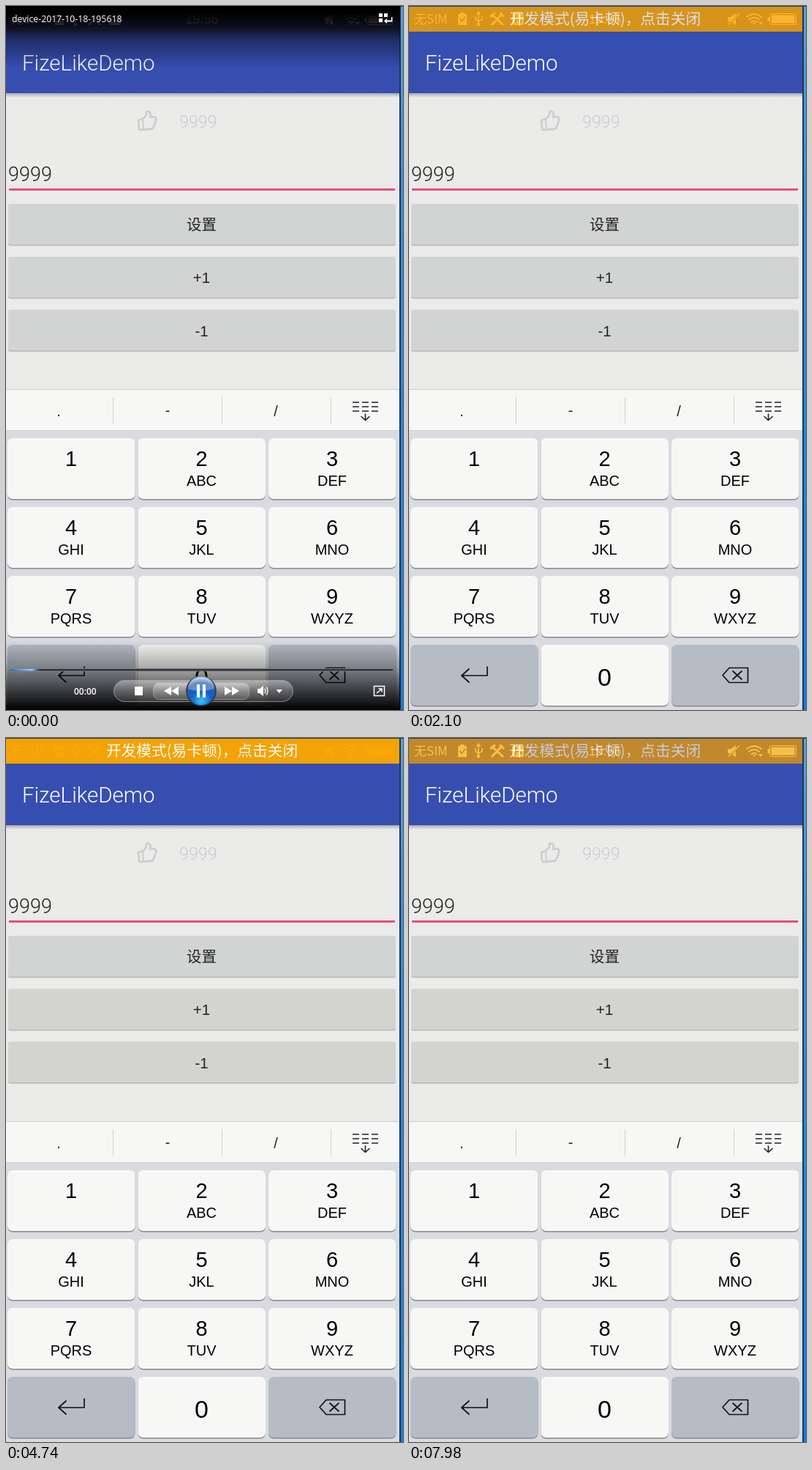
These frames come from a looping animation (543 by 961 pixels, 8000 ms). An HTML page:

```html
<!DOCTYPE html>
<html lang="zh">
<head>
<meta charset="utf-8">
<title>Like counter demo</title>
<style>
html, body { margin: 0; width: 100%; height: 100%; overflow: hidden; background: #ebebe9; }
svg { display: block; width: 543px; height: 961px; font-family: "Liberation Sans", "Noto Sans CJK SC", "Noto Sans CJK", sans-serif; }
.light { font-family: Roboto, sans-serif; font-weight: 300; }
.cjk { font-family: "Noto Sans CJK SC", "Noto Sans CJK", sans-serif; }
.player { font-family: "Open Sans", "Noto Sans", sans-serif; }
.mid { text-anchor: middle; }
.line { fill: none; stroke-linecap: round; stroke-linejoin: round; }
</style>
</head>
<body>
<svg viewBox="0 0 543 961">
  <defs>
    <linearGradient id="edge" x2="0" y2="1"><stop stop-color="#5f9fd4"/><stop offset=".3" stop-color="#2f8fe2"/><stop offset="1" stop-color="#0f7fe6"/></linearGradient>
    <linearGradient id="shadow" x2="0" y2="1"><stop stop-color="#a9abb2"/><stop offset="1" stop-color="#ebebe9"/></linearGradient>
    <linearGradient id="topShade" x2="0" y2="1"><stop offset=".1"/><stop offset=".32" stop-opacity=".82"/><stop offset=".55" stop-opacity=".42"/><stop offset="1" stop-opacity="0"/></linearGradient>
    <linearGradient id="bottomShade" x2="0" y2="1"><stop stop-opacity="0"/><stop offset=".4" stop-opacity=".32"/><stop offset=".72" stop-opacity=".68"/><stop offset="1"/></linearGradient>
    <linearGradient id="pill" x2="0" y2="1"><stop stop-color="#fff" stop-opacity=".42"/><stop offset=".5" stop-color="#fff" stop-opacity=".2"/><stop offset="1" stop-color="#fff" stop-opacity=".1"/></linearGradient>
    <radialGradient id="orb" cy=".85" r=".8"><stop stop-color="#35c4ff"/><stop offset=".45" stop-color="#1560c0"/><stop offset=".8" stop-color="#2b5aa8"/><stop offset="1" stop-color="#a9c6ea"/></radialGradient>
    <linearGradient id="progress"><stop stop-color="#2d6fd0"/><stop offset=".7" stop-color="#9fd0ff"/><stop offset="1" stop-color="#3a78c8" stop-opacity="0"/></linearGradient>
    <g id="thumb" class="line" stroke-width="2.8">
      <path d="M181 156 187 154Q192 151 192 146 192 143 195 144 199 145 197 152L202 151Q206 152 205 156L202 165Q201 168 198 168L184 169Q182 169 182 167Z"/>
      <path d="M187 155 188 168" stroke-width="2"/>
    </g>
  </defs>

  <rect width="543" height="961" fill="#ebebe9"/>

  <!-- status bar -->
  <rect width="539" height="35" fill="#323f97"/>
  <g fill="#fff">
    <text class="cjk" x="7" y="24" font-size="17">无SIM</text>
    <text class="mid" x="268" y="24" font-size="18">19:56</text>
    <path d="M67 11H70V9H76V11H79V26H67Z"/>
    <path class="line" d="M70 18 72 21 77 15" stroke="#323f97" stroke-width="1.6"/>
    <path class="line" d="M95 10V25M91 14V18L95 21 100 18V14M93 11 95 8 97 11" stroke="#fff" stroke-width="1.6"/>
    <circle cx="95" cy="25" r="2.2"/>
    <path class="line" d="M114 12 128 25M127 11 114 25M112 14 117 10M125 10 129 14" stroke="#fff" stroke-width="3"/>
    <rect x="141" y="10" width="16" height="16" rx="2"/>
    <path class="line" d="M146 13V22M146 18H150M153 19V22" stroke="#323f97" stroke-width="1.7"/>
    <path d="M436 15H440L447 10V26L440 21H436Z"/>
    <path d="M437 26 451 11" stroke="#323f97" stroke-width="3"/>
    <path d="M437 25 452 10" stroke="#fff" stroke-width="1.5"/>
    <path class="line" d="M462 15Q472 7 482 15M465 18.500Q472 13 479 18.500M468.500 22Q472 19 475.500 22" stroke="#fff" stroke-width="2"/>
    <path d="M470 23H474L472 26ZM478 22H484L481 26Z"/>
    <rect x="493.500" y="10.500" width="36" height="15" rx="2" fill="none" stroke="#fff"/>
    <path d="M495.500 12.500H527.500V23.500H495.500ZM490.500 15H493V21H490.500Z"/>
  </g>
  <g id="notice">
    <rect width="539" height="35" fill="#f9a602"/>
    <text class="cjk mid" x="268" y="25" font-size="20.700" fill="#fff">开发模式(易卡顿)，点击关闭</text>
  </g>

  <!-- toolbar -->
  <rect y="35" width="539" height="84" fill="#374eb1"/>
  <rect y="119" width="539" height="6" fill="url(#shadow)"/>
  <text class="light" x="22" y="88" font-size="29.500" fill="#fff">FizeLikeDemo</text>

  <!-- like counter -->
  <use id="idleThumb" href="#thumb" stroke="#cdcecd"/>
  <g id="likedThumb" stroke="#e8653c"><use href="#thumb"/></g>
  <path id="rays" class="line" d="M183 140 186 142M189 134 191 139M198 133 196.500 138M203 139 200 141" stroke="#e8653c" stroke-width="2.200"/>
  <circle id="ring" cx="186" cy="157" fill="none" stroke="#bccbe8" stroke-width="2"/>
  <g class="light" font-size="23.300" fill="#c9cbd0">
    <text id="oldCount" x="237">9999</text>
    <text id="newCount" x="237">10000</text>
  </g>

  <!-- edit field -->
  <text class="light" x="3" y="239" font-size="27" fill="#222">9999</text>
  <rect x="4" y="249" width="528" height="3" fill="#ec4c7c"/>
  <rect id="caret" x="63" y="209" width="3" height="37" fill="#ee5583"/>

  <g id="buttons"></g>

  <!-- keyboard -->
  <rect y="523" width="539" height="57" fill="#f7f8f6"/>
  <path d="M0 523.500H539M0 579.500H539M146.500 534V570M295.500 534V570M444.500 534V570" stroke="#cfd0cf"/>
  <g class="mid" font-size="20" fill="#222">
    <text x="72" y="560">.</text><text x="221" y="559">-</text><text x="369" y="560">/</text>
  </g>
  <path d="M474 541H509M474 547H509M474 553H509" stroke="#222" stroke-width="1.600" stroke-dasharray="9 4"/>
  <path class="line" d="M491.500 557V565M486 560.500 491.500 565.500 497 560.500" stroke="#222" stroke-width="1.600"/>
  <rect y="580" width="539" height="381" fill="#d9dbe0"/>
  <g id="keys"></g>
  <path class="line" d="M107 902V914H72M82 905 72 914 82 923" stroke="#111" stroke-width="1.700"/>
  <path class="line" d="M429 913.500 438 903.500H463.500V923.500H438ZM443 908 455 919M455 908 443 919" stroke="#111" stroke-width="1.700"/>

  <!-- window edge -->
  <rect x="538" width="2" height="961" fill="#1c3858"/>
  <rect x="540" width="3" height="961" fill="url(#edge)"/>
  <rect width="543" height="1" fill="#25406a"/>

  <!-- player controls -->
  <g id="player" fill="#fff">
    <rect width="539" height="85" fill="url(#topShade)"/>
    <text class="player" x="8" y="22" font-size="12.300">device-2017-10-18-195618</text>
    <path d="M510 10H515V15H510ZM517 10H522V15H517ZM510 17H515V22H510ZM517 20.500 521 17V19.500H527V15H528.500V21.500H521V24Z"/>
    <rect y="866" width="539" height="95" fill="url(#bottomShade)"/>
    <rect x="6" y="904.500" width="524" height="3.500" rx="1.700" fill="#30343a" stroke="#8b8f96" stroke-width=".8"/>
    <rect x="6" y="905" width="42" height="2.500" rx="1" fill="url(#progress)"/>
    <text class="player" x="93" y="940" font-size="12" font-weight="600">00:00</text>
    <g fill="url(#pill)" stroke="#a5a8ad" stroke-opacity=".75">
      <rect x="147.500" y="920.500" width="245" height="29" rx="14.500"/>
      <rect x="201.500" y="923.500" width="131" height="23" rx="8"/>
    </g>
    <path d="M176 929H187V941H176ZM226 929V941L216 935ZM236 929V941L226 935ZM299 929V941L309 935ZM309 929V941L319 935ZM344 932H347L352 928V942L347 938H344ZM369.500 933H378L373.700 938Z"/>
    <path class="line" d="M354 932Q356 935 354 938M356.500 930Q359.500 935 356.500 940" stroke="#fff" stroke-width="1.300"/>
    <circle cx="267" cy="935" r="20" fill="url(#orb)" stroke="#26364d" stroke-width="1.500"/>
    <path d="M249 932A18 18 0 0 1 285 932Q267 938 249 932Z" opacity=".3"/>
    <path d="M261 926H265V944H261ZM269 926H273V944H269Z"/>
    <path d="M503.500 928.500H517.500V941.500H503.500ZM507 938 514 932M509.500 932H514V936.500" fill="none" stroke="#fff" stroke-width="1.500"/>
  </g>
</svg>
<script>
const LOOP = 8000;
const byId = id => document.getElementById(id);
const set = (id, attrs) => {
  for (const name in attrs) byId(id).setAttribute(name, attrs[name]);
};
const clamp = v => Math.min(1, Math.max(0, v));
const ramp = (t, start, length) => clamp((t - start) / length);

byId('buttons').innerHTML = ['设置', '+1', '-1'].map((label, i) => {
  const y = 270 + 72.3 * i;
  return `<rect x="3" y="${y + 1.5}" width="530" height="56" rx="3" fill="#c2bfbe"/>
    <rect id="button${i}" x="3" y="${y}" width="530" height="55.500" rx="3" fill="#d2d4d3"/>
    <text class="mid" x="267.500" y="${y + 36}" font-size="20.500" fill="#222">${label}</text>`;
}).join('');

const letters = ['', 'ABC', 'DEF', 'GHI', 'JKL', 'MNO', 'PQRS', 'TUV', 'WXYZ'];
byId('keys').innerHTML = Array.from({ length: 12 }, (_, i) => {
  const x = 2 + 178.5 * (i % 3), y = 590 + 94 * Math.floor(i / 3);
  const control = i === 9 || i === 11;
  const text = (label, dy, size) =>
    `<text class="mid" x="${x + 87}" y="${y + dy}" font-size="${size}">${label}</text>`;
  const caption = i < 9 ? text(i + 1, 38, 29) + text(letters[i], 65, 20)
    : i === 10 ? text(0, 56, 34) : '';
  return `<rect x="${x}" y="${y + 1.5}" width="174.500" height="83" rx="7" fill="#85888d"/>
    <rect x="${x}" y="${y}" width="174.500" height="83" rx="7" fill="${control ? '#b6bcc6' : '#f7f8f6'}"/>${caption}`;
}).join('');

const LIKE = 280;  // length of a like or unlike transition
const scaleAbout = (x, y, s) => `translate(${x} ${y}) scale(${s}) translate(${-x} ${-y})`;

function draw(t) {
  set('notice', { opacity: (1 + Math.cos(2 * Math.PI * (t - 4590) / 2880)) / 2 });
  set('player', { opacity: 1 - ramp(t, 860, 260) });

  const blink = t % 1003;
  set('caret', { opacity: blink >= 212 && blink < 714 ? 1 : 0 });

  const rise = ramp(t, 3180, LIKE) + ramp(t, 6580, LIKE);
  const liked = rise - ramp(t, 4260, LIKE) - ramp(t, 7560, LIKE);
  set('idleThumb', { opacity: clamp(1 - 2 * liked), transform: scaleAbout(193, 157, 1 - 0.4 * liked) });
  set('likedThumb', { opacity: clamp(1.2 * liked), transform: scaleAbout(193, 157, 0.4 + 0.6 * liked) });
  set('rays', { opacity: clamp(3 * liked - 1.2), transform: scaleAbout(193, 142, 0.6 + 0.4 * liked) });
  set('ring', { r: 3 + 20 * liked, opacity: rise % 1 ? Math.sin(Math.PI * liked) : 0 });
  set('oldCount', { y: 165.5 - 40 * liked, opacity: clamp(1 - 1.4 * liked) });
  set('newCount', { y: 165.5 + 40 * (1 - liked), opacity: liked });

  set('button1', { fill: t < 3180 ? '#d2d4d3' : '#d3d3d0' });
  set('button2', { fill: t < 4260 ? '#d2d4d3' : '#d3d3d0' });
}

const start = performance.now();
function tick() {
  draw((performance.now() - start) % LOOP);
  requestAnimationFrame(tick);
}
tick();
</script>
</body>
</html>
```
